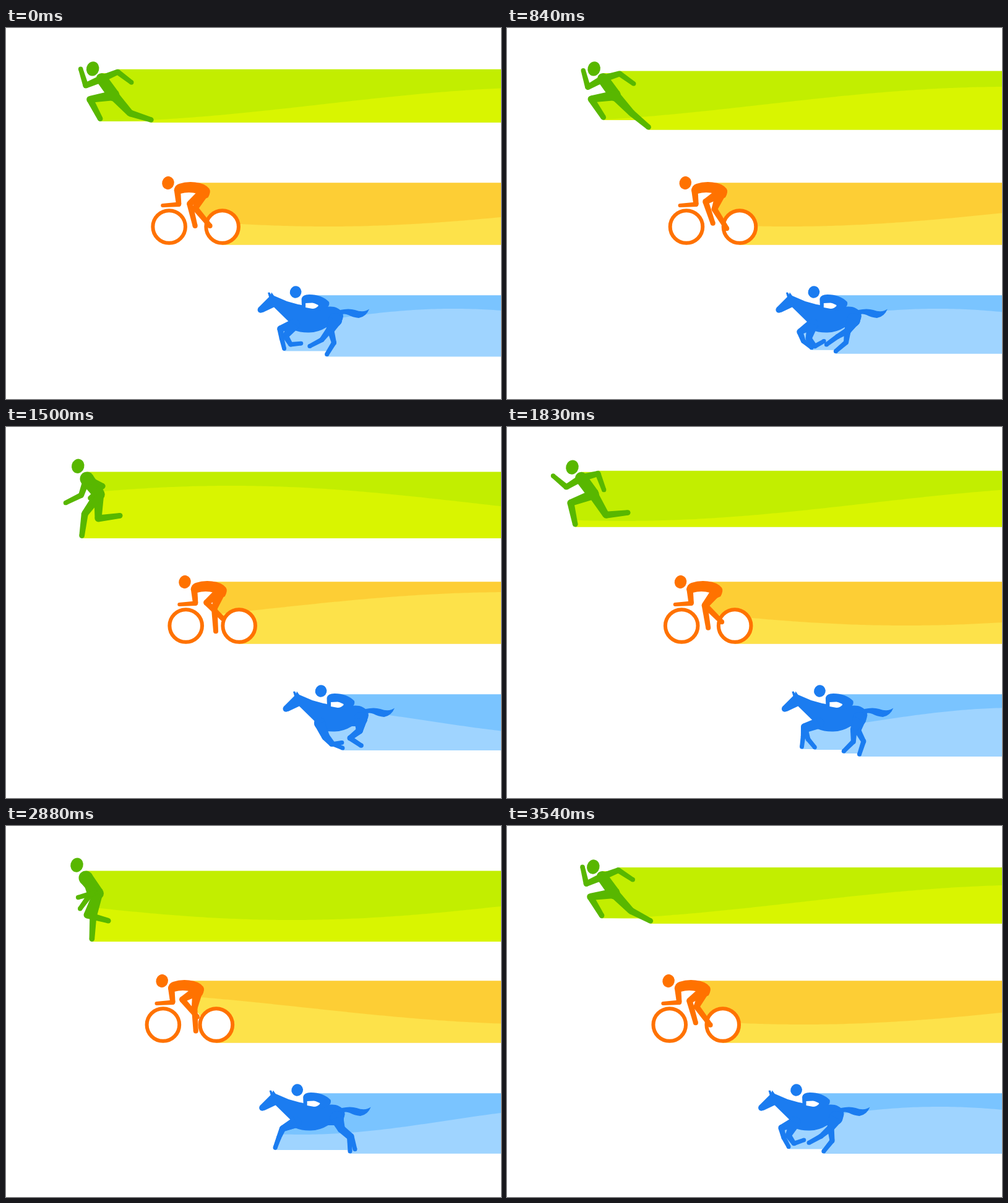
An HTML page with a canvas for the animation above (3.57 s loop, 800 by 600 pixels).

```html
<!DOCTYPE html>
<html lang="en">
<head>
<meta charset="utf-8">
<title>Race</title>
<style>
  html, body { margin: 0; width: 100%; height: 100%; overflow: hidden; background: #fff; }
  canvas { display: block; width: 800px; height: 600px; }
</style>
</head>
<body>
<canvas id="stage" width="800" height="600"></canvas>
<script>
const ctx = document.getElementById('stage').getContext('2d');
const STEP = 30, STEPS = 119, STRIDE = STEPS / 4, TAU = Math.PI * 2;

// Limb segments: length, mean angle in degrees (0 down, positive forward),
// then [amplitude, lag] of each harmonic of the stride.
const runLeg = [
  [39, 19, [63, -.034]],
  [35.5, -42, [-47, .645], [-12, .067], [-7, -.02]]
];
const runArm = [
  [28, -23, [90, 0]],
  [28, 55, [101, -.047], [0, 0], [12, -.02]]
];
const foreLeg = [
  [24, 32, [50, .139], [11, -.058]],
  [16, -10, [33, .242]],
  [17, -31, [62, .268], [20, .067], [11.5, -.019]]
];
const hindLeg = [
  [19, 0, [27, -.139], [6, -.046]],
  [20, 0, [58, -.256], [8.4, .25], [6, .128]],
  [22, -8, [52, -.022], [24, -.128], [12, .148]]
];

const bikeTorso = new Path2D('M8 263Q9 254 16 252Q28 248 42 249.5Q58 251 65 260Q68 265 63 274L54 278L46 268Q32 264 18 268L14 272Z');
const horseBody = new Path2D('M-60 452L-43 435L-45 428L-42 427.5L-40 431L-39 427.5L-35 433L-14 442L4 447Q10 447 20 453L35 455Q50 449 62 451Q76 455 77 466Q76 476 66 484L50 484Q36 492.5 22 492.5Q8 493 -4 488L-10 476L-35 451.5L-53 460Z');
const horseTail = new Path2D('M72 456Q86 453 96 456Q110 461 119 454.5Q114 467 102 469Q92 468 85 464Q78 461 73 464Z');
const jockey = new Path2D('M9.5 438Q11 431 22 431Q42 431 54 443Q56 450 48 454L40 457L16 456L10 452Z');
const jockeyGap = new Path2D('M16 445L27 444.5Q34 446 37 449Q33 454 27 454L16 452Z');

const cycle = p => Math.cos(TAU * p);

// Joints of a swinging limb, from its root outwards.
function chain(root, segments, p) {
  const joints = [root];
  for (const [len, mean, ...waves] of segments) {
    const [x, y] = joints[joints.length - 1];
    const deg = waves.reduce((sum, [amp, lag], i) => sum + amp * cycle((i + 1) * (p - lag)), mean);
    const a = deg * Math.PI / 180;
    joints.push([x - len * Math.sin(a), y + len * Math.cos(a)]);
  }
  return joints;
}

// Two-segment leg from hip to foot, with the knee bent forward.
function bend(hip, foot, thigh, shin) {
  const dx = foot[0] - hip[0], dy = foot[1] - hip[1], d = Math.hypot(dx, dy);
  const along = (thigh ** 2 - shin ** 2 + d * d) / (2 * d);
  const out = Math.sqrt(Math.max(0, thigh ** 2 - along ** 2));
  return [hip, [hip[0] + (dx * along - dy * out) / d, hip[1] + (dy * along + dx * out) / d], foot];
}

function disc(x, y, rx, ry = rx, tilt = 0) {
  ctx.beginPath();
  ctx.ellipse(x, y, rx, ry, tilt, 0, TAU);
  ctx.fill();
}

// Chain of tapered segments with round joints.
function limb(pts, radii) {
  pts.forEach(([x, y], i) => {
    const r = radii[i];
    disc(x, y, r);
    if (!i) return;
    const [px, py] = pts[i - 1], q = radii[i - 1];
    const len = Math.hypot(x - px, y - py) || 1;
    const nx = (py - y) / len, ny = (x - px) / len;
    ctx.beginPath();
    ctx.moveTo(px + nx * q, py + ny * q);
    ctx.lineTo(x + nx * r, y + ny * r);
    ctx.lineTo(x - nx * r, y - ny * r);
    ctx.lineTo(px - nx * q, py - ny * q);
    ctx.fill();
  });
}

// Adds everything to the right of a polyline, always wound the same way.
function sweep(path, pts) {
  for (let i = 1; i < pts.length; i++) {
    const [a, b] = [pts[i - 1], pts[i]].sort((m, n) => m[1] - n[1]);
    path.moveTo(...a);
    path.lineTo(...b);
    path.lineTo(800, b[1]);
    path.lineTo(800, a[1]);
    path.closePath();
  }
}
const below = ([x, y], d) => [x, y + d];
const sweepLeg = (path, leg, r) => sweep(path, [...leg, below(leg[leg.length - 1], r)]);

// Two-tone trail; its wave runs backwards one wavelength per stride.
function trail(path, p, { dark, light, crest, length, mid, amp }) {
  ctx.fillStyle = dark;
  ctx.fill(path);
  ctx.save();
  ctx.clip(path);
  ctx.fillStyle = light;
  ctx.beginPath();
  ctx.moveTo(800, 600);
  ctx.lineTo(-100, 600);
  for (let x = -100; x <= 800; x += 5) ctx.lineTo(x, mid - amp * cycle((x - crest) / length - p));
  ctx.fill();
  ctx.restore();
}

function runner(p, lane) {
  const bob = cycle(2 * (p + .03));
  const neck = [14.5, 83 - bob], hip = [34, 109], chest = 10.3 - 1.2 * bob;
  const sides = [p, p + .5];
  const legs = sides.map(q => chain(hip, runLeg, q));
  const arms = sides.map(q => chain(neck, runArm, q));

  const path = new Path2D();
  sweep(path, [below(neck, -chest), neck, hip]);
  legs.forEach(leg => sweepLeg(path, leg, 4.3));
  arms.forEach(([, elbow]) => {
    if (elbow[0] > neck[0]) sweep(path, [below(elbow, -4.5), neck]);
  });
  trail(path, p, lane);

  ctx.fillStyle = lane.ink;
  disc(0, 64.5 + 1.5 * bob, 10.2, 11.7, .25);
  limb([neck, hip], [chest, 9.5]);
  legs.forEach(leg => limb(leg, [8, 5.5, 4.3]));
  arms.forEach(arm => limb(arm, [6, 4.5, 3.7]));
}

function cyclist(p, lane) {
  const hip = [56, 266], axle = 321.5;
  const legs = [p, p + .5].map(q => {
    const foot = [54 - 12 * cycle(q), 320 + 11.5 * Math.sin(TAU * q)];
    return bend(hip, foot, 29, 37);
  });
  const knee = legs[0][1][0] > legs[1][1][0] ? legs[0][1] : legs[1][1];

  const path = new Path2D();
  sweep(path, [[45, 250.3], hip, knee, [64, 312], [86, axle], [86, 350.5]]);
  trail(path, p, lane);

  ctx.lineWidth = 6;
  ctx.strokeStyle = lane.ink;
  for (const x of [0, 86]) {
    ctx.fillStyle = '#fff';
    disc(x, axle, 26.3);
    ctx.stroke();
  }
  ctx.fillStyle = lane.ink;
  disc(-1.7, 250.5, 9.7, 10.7, .25);
  ctx.fill(bikeTorso);
  limb([[13.3, 262], [15.5, 284.5]], [5.2, 4.2]);
  limb([[15.5, 285.2], [-10.5, 287]], [3.8, 2.9]);
  legs.forEach(leg => limb(leg, [8.5, 4.8, 4]));
}

function rider(p, lane) {
  const chest = [-2, 479], hip = [64, 472];
  // The far leg of each pair trails the near one by a varying part of the stride.
  const fore = [p, p - .12 * cycle(p)].map(q => chain(chest, foreLeg, q));
  const hind = [p, p - .04 - .08 * cycle(p)].map(q => chain(hip, hindLeg, q));

  const path = new Path2D();
  sweep(path, [[30, 432.3], [50, 450], hip]);
  [...fore, ...hind].forEach(leg => sweepLeg(path, leg, 3.7));
  trail(path, p, lane);

  ctx.fillStyle = lane.ink;
  disc(0, 427, 9.3, 9.8, .25);
  disc(-56.5, 455.8, 5);
  [horseBody, horseTail, jockey].forEach(shape => ctx.fill(shape));
  fore.forEach(leg => limb(leg, [9, 5, 3.8, 3.4]));
  hind.forEach(leg => limb(leg, [11, 5.5, 4, 3.5]));
  ctx.fillStyle = '#fff';
  ctx.fill(jockeyGap);
}

// Each racer drifts around x by sway, furthest right at its peak (part of the loop).
const lanes = [
  { draw: runner, x: 123.4, sway: 23, peak: .12, ink: '#58b700', dark: '#c2ee00', light: '#d9f500',
    crest: 765, length: 1580, mid: 123.5, amp: 28.5 },
  { draw: cyclist, x: 273.6, sway: 20, peak: .333, ink: '#ff7200', dark: '#fdce35', light: '#fde24a',
    crest: 1046, length: 1580, mid: 294, amp: 27 },
  { draw: rider, x: 487.2, sway: 21.8, peak: .42, ink: '#1b7cf0', dark: '#7ac4ff', light: '#9fd4ff',
    crest: 255, length: 940, mid: 476.5, amp: 22.5 }
];

function frame() {
  const step = Math.floor(performance.now() / STEP) % STEPS;
  const p = Math.round(step % STRIDE) / STRIDE; // poses advance in whole steps
  ctx.fillStyle = '#fff';
  ctx.fillRect(0, 0, 800, 600);
  for (const lane of lanes) {
    ctx.save();
    ctx.translate(lane.x + lane.sway * cycle(step / STEPS - lane.peak), 0);
    lane.draw(p, lane);
    ctx.restore();
  }
  requestAnimationFrame(frame);
}
frame();
</script>
</body>
</html>
```
